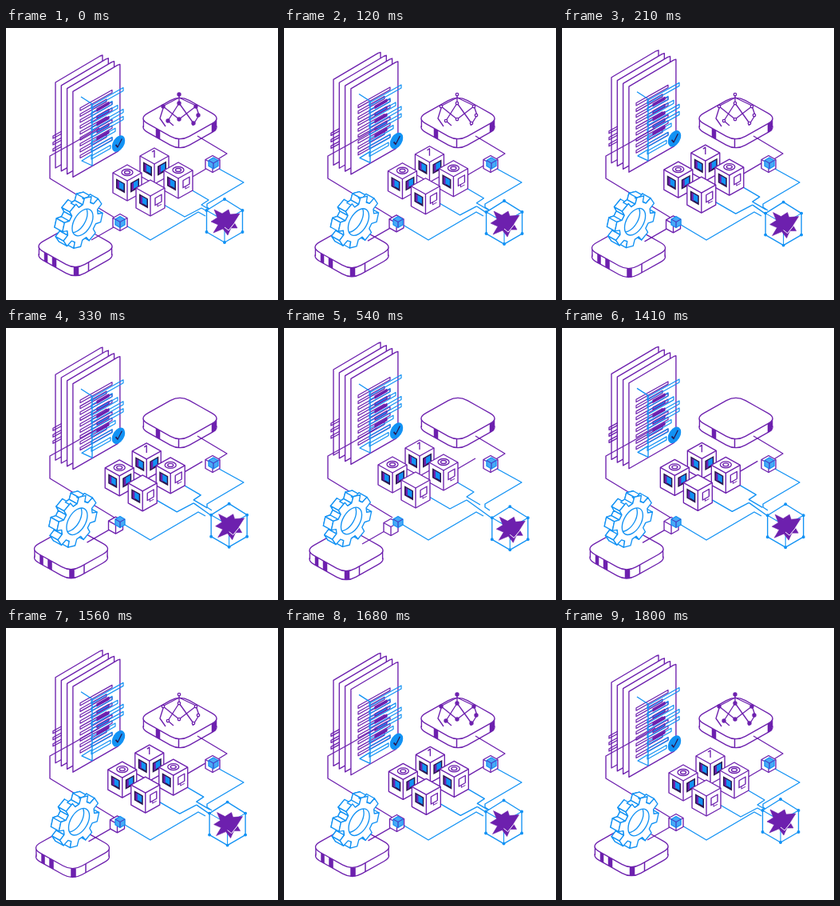
Animation, 341 px wide and 340 px high, one loop 1.83 s. Source, as an HTML page with a canvas:

```html
<!DOCTYPE html>
<html lang="en">
<head>
<meta charset="utf-8">
<title>Isometric network</title>
<style>
html, body { margin: 0; width: 100%; height: 100%; overflow: hidden; background: #fff; }
canvas { display: block; width: 341px; height: 340px; }
</style>
</head>
<body>
<canvas id="stage" width="341" height="340"></canvas>
<script>
const ctx = document.getElementById('stage').getContext('2d');
const PURPLE = '#6d20ae', BLUE = '#1292f4', DARK = '#2b174f', WHITE = '#fff';
const LOOP = 1830, STEP = 30, STEPS = 18, BACK = 1260;
const ISO = 0.56;

// 0 = assembled, 1 = spread apart
function spread(t) {
  if (t < BACK) return Math.min(1, Math.floor(t / STEP) / STEPS);
  return Math.max(0, 1 - (Math.floor((t - BACK) / STEP) + 1) / STEPS);
}

function paint(stroke, fill, width = 1.35) {
  if (fill) { ctx.fillStyle = fill; ctx.fill(); }
  if (stroke) { ctx.strokeStyle = stroke; ctx.lineWidth = width; ctx.stroke(); }
}

function line(points, color, width) {
  ctx.beginPath();
  points.forEach(([x, y]) => ctx.lineTo(x, y));
  paint(color, null, width);
}

function shape(points, stroke, fill, width) {
  ctx.beginPath();
  points.forEach(([x, y]) => ctx.lineTo(x, y));
  ctx.closePath();
  paint(stroke, fill, width);
}

function dot(x, y, r, stroke, fill) {
  ctx.beginPath();
  ctx.arc(x, y, r, 0, Math.PI * 2);
  paint(stroke, fill);
}

function at(x, y, draw) {
  ctx.save();
  ctx.translate(x, y);
  draw();
  ctx.restore();
}

function box(x, y, w, d, h, stroke, fill) {
  shape([[x, y], [x + w, y + d], [x + w, y + d + h], [x, y + 2 * d + h],
    [x - w, y + d + h], [x - w, y + d]], stroke, fill);
  line([[x - w, y + d], [x, y + 2 * d], [x + w, y + d]], stroke);
  line([[x, y + 2 * d], [x, y + 2 * d + h]], stroke);
}

// Rounded slab, origin at the centre of its top face
function slab(x, y, bars) {
  const w = 52, d = 29, h = 11;
  function outline() {
    ctx.beginPath();
    ctx.moveTo(w / 2, -d / 2);
    [[w, 0], [0, d], [-w, 0], [0, -d]].forEach(([cx, cy], i, all) => {
      const [nx, ny] = all[(i + 1) % 4];
      const [px, py] = all[(i + 3) % 4];
      ctx.lineTo(cx + (px - cx) * 0.23, cy + (py - cy) * 0.23);
      ctx.quadraticCurveTo(cx, cy, cx + (nx - cx) * 0.23, cy + (ny - cy) * 0.23);
    });
    ctx.closePath();
  }
  at(x, y, () => {
    ctx.translate(0, h);
    outline();
    paint(PURPLE, WHITE);
    ctx.fillStyle = WHITE;
    ctx.fillRect(-45.2, -h, 90.4, h);
    ctx.translate(0, -h);
    line([[-45.6, 0], [-45.6, h]], PURPLE);
    line([[45.6, 0], [45.6, h]], PURPLE);
    bars.forEach(([bx, bw]) => {
      const edge = u => Math.min(25.5, d * (1 - Math.abs(u) / w));
      shape([[bx, edge(bx)], [bx + bw, edge(bx + bw)],
        [bx + bw, edge(bx + bw) + h], [bx, edge(bx) + h]], PURPLE, PURPLE, 0.5);
    });
    outline();
    paint(PURPLE, WHITE);
  });
}

function gear(x, y) {
  const teeth = 8, pts = [];
  for (let i = 0; i < teeth; i++) {
    [[-0.26, 22], [-0.18, 29], [0.18, 29], [0.26, 22]].forEach(([da, r]) => {
      const a = (i + 0.35) / teeth * Math.PI * 2 + da;
      const u = r * Math.cos(a);
      pts.push([u * 0.87, r * Math.sin(a) - u * 0.5]);
    });
  }
  const depth = [-10, -5.5];
  const back = ([px, py]) => [px + depth[0], py + depth[1]];
  at(x, y, () => {
    shape(pts.map(back), BLUE, WHITE);
    pts.forEach((p, i) => {
      const q = pts[(i + 1) % pts.length];
      shape([p, q, back(q), back(p)], null, WHITE);
    });
    pts.forEach((p, i) => {
      const q = pts[(i + 1) % pts.length];
      const facing = (q[0] - p[0]) * depth[1] - (q[1] - p[1]) * depth[0];
      if (facing < 0) shape([p, q, back(q), back(p)], BLUE, WHITE);
    });
    shape(pts, BLUE, WHITE);
    const ring = () => {
      ctx.save();
      ctx.transform(0.87, -0.5, 0, 1, 0, 0);
      ctx.beginPath();
      ctx.arc(0, 0, 15, 0, Math.PI * 2);
      ctx.restore();
    };
    ring();
    paint(BLUE);
    ctx.save();
    ctx.clip();
    ctx.translate(-7, -4);
    ring();
    paint(BLUE);
    ctx.restore();
  });
}

function row(x, y, w, h, color, fill) {
  shape([[x, y], [x + w, y - w * ISO], [x + w, y - w * ISO + h], [x, y + h]], color, fill, 1.2);
}

function documents(dy) {
  at(0, dy, () => {
    for (let i = 0; i < 4; i++) {
      const x = 62 + i * 7.3, y = 68 + i * 3.8;
      shape([[x, y], [x + 56, y - 33], [x + 59, y - 34], [x + 59, y + 72],
        [x + 56, y + 75], [x, y + 107]], PURPLE, WHITE);
    }
    for (let i = 0; i < 3; i++) {
      line([[70, 129 + i * 8], [59, 135 + i * 8], [59, 138 + i * 8], [70, 132 + i * 8]], PURPLE);
    }
    for (let i = 0; i < 9; i++) {
      const inset = i % 3 === 1 ? 7 : 0;
      row(93, 100 + i * 7.4, 40 - inset, 3.2, PURPLE);
    }
    for (let i = 0; i < 8; i++) {
      const inset = [0, 14, 7, 0, 0, 10, 14, 16][i];
      row(107, 97 + i * 9, 40 - inset, 4, BLUE);
    }
    for (let i = 0; i < 5; i++) row(114, 101 + i * 9, 15, 3, PURPLE, i % 2 ? BLUE : PURPLE);
    line([[94, 86], [108, 95], [108, 172], [95, 166], [108, 158]], BLUE);
    at(141, 144.5, () => {
      ctx.transform(0.87, -0.4, 0, 1, 0, 0);
      dot(0, 0, 8.8, BLUE, BLUE);
      line([[-4, 0], [-1, 4], [5, -4]], DARK, 1.6);
    });
  });
}

function pane(x, y, slope, filled) {
  ctx.save();
  ctx.transform(1, slope, 0, 1, x, y);
  if (filled) {
    ctx.fillStyle = DARK;
    ctx.fillRect(4, 5, 11, 12);
    ctx.fillStyle = PURPLE;
    ctx.fillRect(5.5, 6.5, 3, 9);
    ctx.fillStyle = BLUE;
    ctx.fillRect(8, 6.5, 5.5, 8);
  } else {
    ctx.beginPath();
    ctx.rect(6, 6, 8, 9);
    paint(PURPLE);
    line([[9, 15], [9, 18], [14, 18]], PURPLE, 1);
  }
  ctx.restore();
}

function block(x, y, top, rightFilled) {
  box(x, y, 18, 10, 25, PURPLE, WHITE);
  pane(x - 18, y + 10, ISO, true);
  pane(x, y + 20, -ISO, rightFilled);
  if (top === 'ring') {
    [[7, 4], [3.5, 2]].forEach(([rx, ry]) => {
      ctx.beginPath();
      ctx.ellipse(x, y + 9.5, rx, ry, 0, 0, Math.PI * 2);
      paint(PURPLE);
    });
  } else if (top === 'pin') {
    line([[x - 3, y + 5], [x, y + 3], [x, y + 12]], PURPLE);
  }
}

function cluster(dx, dy) {
  at(dx, dy, () => {
    line([[232, 187], [256, 173]], PURPLE);
    line([[198, 221], [224, 236], [245, 225]], BLUE);
    line([[230, 201], [254, 215], [245, 221], [262, 231]], BLUE);
    block(186, 150, 'pin', true);
    block(152, 171, 'ring', true);
    block(216, 168, 'ring', false);
    block(181, 190, '', false);
  });
}

function graph(small) {
  const nodes = [[217, 83], [197, 98], [238, 98], [217, 94], [241, 109],
    [203, 116], [217, 114], [235, 119]];
  line([[200, 123], [193, 113], [198, 97], [217, 87], [238, 97], [242, 109], [234, 122]], PURPLE);
  line([[197, 98], [217, 114], [238, 98]], PURPLE);
  line([[217, 84], [217, 94], [203, 116], [210, 122]], PURPLE);
  line([[217, 94], [235, 119]], PURPLE);
  nodes.forEach(([x, y]) => dot(x, y, small ? 1.7 : 2, PURPLE, small ? WHITE : PURPLE));
}

function lattice(x, y) {
  const hex = [[0, -27], [22.5, -13], [22.5, 14], [0, 27], [-22.5, 14], [-22.5, -13]];
  at(x, y, () => {
    shape(hex, BLUE, WHITE);
    line([hex[5], [0, 0], hex[1]], BLUE, 1.1);
    line([[0, 0], hex[3]], BLUE, 1.1);
    shape([[-13, -14], [-3, -9], [5, -14], [7, -8], [19, -9], [12, 2], [16, 9],
      [8, 9], [4, 18], [-2, 10], [-14, 15], [-8, 5], [-17, 1], [-9, -4]], PURPLE, PURPLE, 0.6);
    line([[0, 8], [5, 12], [14, 1]], WHITE, 1);
    hex.forEach(([hx, hy]) => dot(hx, hy, 1.3, BLUE, BLUE));
  });
}

function hub(x, y, blueX, blueY) {
  box(x, y - 10.5, 9, 5, 11, PURPLE, WHITE);
  box(blueX, blueY - 7, 6, 3.5, 7, BLUE, '#49a9f5');
  line([[blueX - 6, blueY - 3.5], [blueX, blueY], [blueX + 6, blueY - 3.5]], PURPLE, 0.8);
  line([[blueX, blueY], [blueX, blueY + 7]], PURPLE, 0.8);
}

function draw(p) {
  ctx.fillStyle = WHITE;
  ctx.fillRect(0, 0, 341, 340);
  ctx.lineJoin = 'round';

  documents(-16 * p);
  line([[117, 125], [84, 144], [55, 160], [55, 188], [136, 237]], PURPLE);

  slab(218, 113, [[-30, 5], [-2, 1], [40, 5]]);
  if (p < 0.5) graph(p > 0.2);
  line([[240, 135], [277, 157], [264, 165]], PURPLE);

  const lx = 9.3 * p, ly = 9.3 * p;
  line([[149, 246], [181, 265], [241, 230], [250, 235]], BLUE);
  line([[267, 176], [298, 193], [252, 220], [252, 224], [258, 228]], BLUE);
  line([[245 - 16 * p, 225 - 10 * p], [252 + lx, 229 + ly]], BLUE);

  cluster(-16 * p, -10 * p);
  hub(259, 170, 260, 169);
  lattice(274 + lx, 241 + ly);

  const px = -9 * p, py = 5 * p;
  slab(87 + px, 273 + py, [[-39, 4], [-29, 5], [-2, 6], [16, 1]]);
  line([[107 + px, 265 + py], [135 + px, 249 + py]], PURPLE);
  gear(96 - 11.5 * p, 243 - 2 * p);
  hub(143 + px, 243 + 6 * p, 143, 242.5);
}

function frame(now) {
  draw(spread(now % LOOP));
  requestAnimationFrame(frame);
}
draw(0);
requestAnimationFrame(frame);
</script>
</body>
</html>
```
